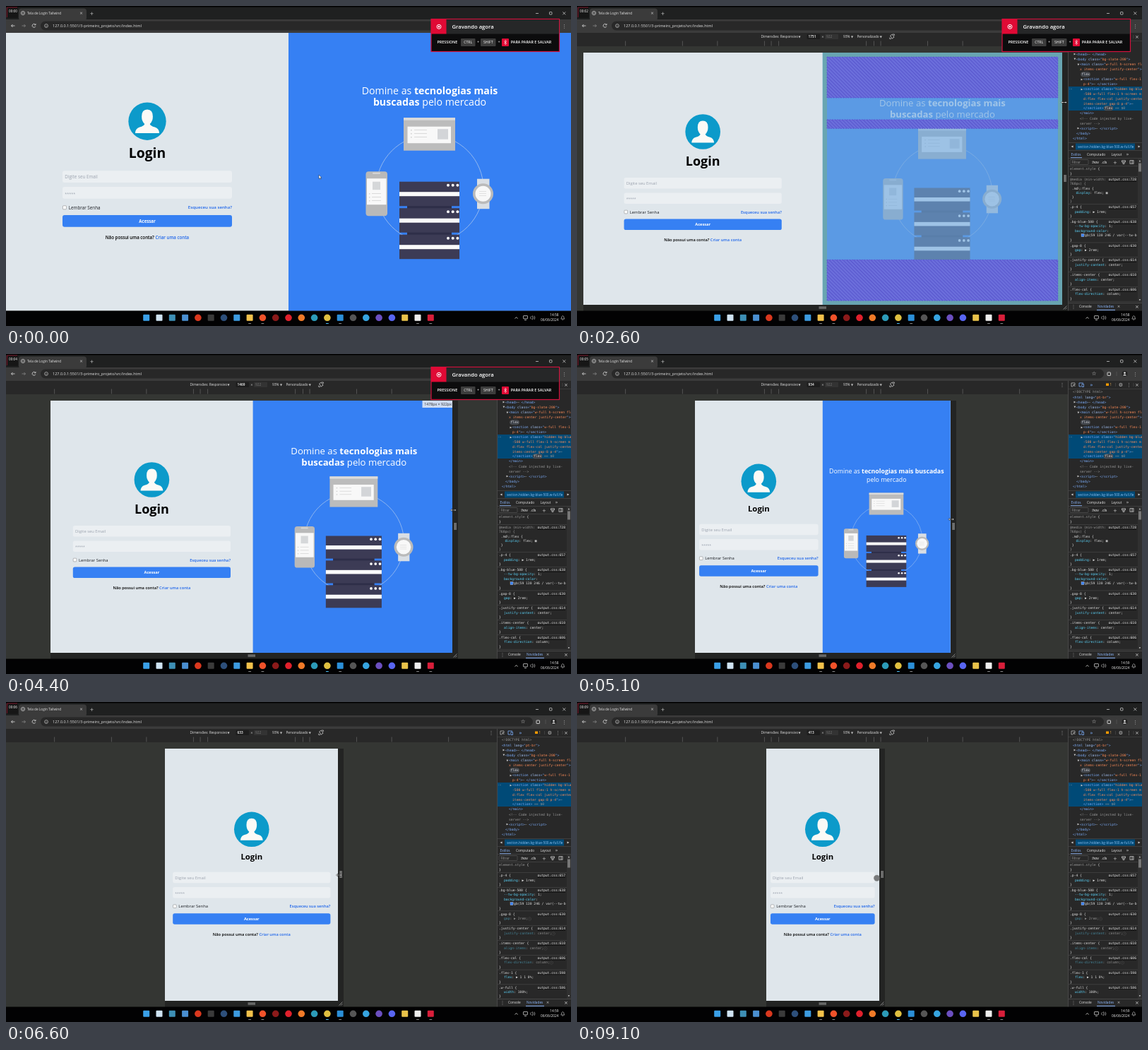
Animation of 800x453 px, one loop 9300 ms. Source, as an HTML page:

```html
<!DOCTYPE html>
<html lang="pt-br">
<head>
<meta charset="utf-8">
<style>
html, body { margin: 0; width: 100%; height: 100%; overflow: hidden; background: #000; }
svg { display: block; width: 100vw; height: 100vh; }
text { white-space: pre; font-family: "Open Sans", "Noto Sans", sans-serif; }
.m { font-family: "DejaVu Sans Mono", "Liberation Mono", monospace; }
.i { font-family: "DejaVu Sans", sans-serif; }
</style>
</head>
<body>
<svg id="stage" viewBox="0 0 800 453" preserveAspectRatio="none"></svg>
<script>
const stage = document.getElementById('stage');
const LOOP = 9300, FULL = 1 / 2.4, ZOOM = 0.3875, MID = 347.8;
const BLUE = '#3680f3', SLATE = '#dfe6eb', LINK = '#1f66ea';

// --- drawing helpers (text y is the middle of the line) ---
const esc = s => s.replace(/&/g, '&amp;').replace(/</g, '&lt;');
const rect = (x, y, w, h, fill, rx = 0, more = '') =>
  `<rect x="${x}" y="${y}" width="${w}" height="${h}" fill="${fill}" rx="${rx}" ${more}/>`;
const circle = (x, y, r, fill, more = '') => `<circle cx="${x}" cy="${y}" r="${r}" fill="${fill}" ${more}/>`;
const path = (d, stroke, w = 1, fill = 'none') => `<path d="${d}" stroke="${stroke}" stroke-width="${w}" fill="${fill}"/>`;
const text = (x, y, size, s, fill = '#e3e3e3', more = '') =>
  `<text x="${x}" y="${y + size * 0.36}" font-size="${size}" fill="${fill}" ${more}>${esc(s)}</text>`;
const icon = (x, y, size, s, fill = '#c7c7c7') => text(x, y, size, s, fill, 'class="i" text-anchor="middle"');
const group = (transform, body) => `<g transform="${transform}">${body}</g>`;
const MIDDLE = 'text-anchor="middle" ', END = 'text-anchor="end" ', BOLD = 'font-weight="700"', SEMI = 'font-weight="600"';

// "^x" inside a string switches to colour x
const INK = { t: '#7cacf8', n: '#a8c7fa', v: '#fe8d59', g: '#9a9a9a', w: '#e3e3e3', c: '#5cd5fb' };
const mono = (x, y, s, more = '') => `<text class="m" x="${x}" y="${y + 1.6}" font-size="4.7" ${more}>` +
  s.split('^').slice(1).map(p => `<tspan fill="${INK[p[0]]}">${esc(p.slice(1))}</tspan>`).join('') + '</text>';

function track(keys, t) {
  const i = keys.findIndex(k => k[0] > t);
  if (i < 0) return keys[keys.length - 1].slice(1);
  if (i === 0) return keys[0].slice(1);
  const a = keys[i - 1], b = keys[i], f = (t - a[0]) / (b[0] - a[0]);
  return a.slice(1).map((v, j) => v + (b[j + 1] - v) * f);
}

// --- motion ---
const widthKeys = [[2800, 1751], [3600, 1619], [4400, 1469], [5000, 934], [5200, 934], [6000, 745],
  [6500, 633], [6700, 633], [7800, 425], [8100, 416], [8400, 416], [8700, 413]];
const pointerKeys = [[0, 443, 239], [500, 462, 197], [1000, 462, 197], [1200, 484, 247], [1500, 497, 374],
  [1900, 497, 374], [2300, 745, 130], [2600, 689.5, 136.5]];
const gripKeys = [[2600, 136.5], [4400, 221], [5100, 234], [6600, 245], [8400, 249]];

// --- web page, in CSS pixels ---
function avatar() {
  return circle(0, 0, 64, '#0c9aca') +
    path('M-41 40 Q-40 24 -26 20 Q-11 16 -9 9 Q-19 0 -19 -16 Q-19 -40 0 -40 Q19 -40 19 -16 Q19 0 9 9 Q11 16 26 20 Q40 24 41 40 Z', 'none', 0, '#fbfaf6');
}

function form(cx, cy, room, small) {
  const w = Math.min(576, room), l = -w / 2, d = small ? -12 : 0;
  const box = (y, fill) => rect(l, y + d, w, 40, fill, 7);
  return group(`translate(${cx} ${cy - 172 - d / 2})`, avatar() +
    text(0, small ? 99 : 107, small ? 29.3 : 46.5, 'Login', '#000', MIDDLE + BOLD) +
    box(168, '#ebeff2') + text(l + 8, 188 + d, 15.1, 'Digite seu Email', '#9ca3af') +
    box(223, '#ebeff2') + text(l + 8, 246 + d, 13, '*****', '#9ca3af') +
    rect(l + 1, 287 + d, 12, 12, '#fff', 2, 'stroke="#767676" stroke-width="1.2"') +
    text(l + 21, 293 + d, 15.1, 'Lembrar Senha', '#1c1f24') +
    text(-l, 293 + d, 14.7, 'Esqueceu sua senha?', LINK, END + SEMI) +
    box(319, BLUE) + text(0, 339 + d, 14.6, 'Acessar', '#fff', MIDDLE + BOLD) +
    `<text x="0" y="${401 + d}" font-size="14.8" ${MIDDLE + SEMI}>Não possui uma conta? <tspan fill="${LINK}">Criar uma conta</tspan></text>`);
}

function devices() {
  let s = circle(600, 258.5, 76, 'none', 'stroke="#a9c6ee" stroke-width=".8"');
  // monitor
  s += rect(563, 158, 73, 46.5, '#bcbcbc') + rect(563, 158, 73, 3.5, '#dcdcdc') + rect(568.5, 170.5, 61.5, 23.5, '#f8f8f8') +
    rect(611, 174, 15, 14.5, '#d3d5d8');
  for (const y of [175, 180, 185]) s += rect(573, y, 1.6, 1.2, '#c8c8c8') + rect(578, y, 18, 0.8, '#d4d4d4');
  // phone
  s += rect(509.5, 234, 30.5, 63, '#b9b9b9', 4) + rect(511, 244, 27.5, 37, '#f8f8f8') + rect(519, 248.5, 11, 11.5, '#d5d7d9') +
    rect(519, 235.5, 11, 2, '#d8d8d8', 1);
  for (const y of [265, 270, 275]) s += rect(514, y, 1.5, 1.2, '#ccc') + rect(518, y, 13, 0.8, '#d4d4d4');
  // watch
  s += rect(667, 244.5, 17.5, 42.5, '#d9dee4') + circle(675.5, 265.5, 14.5, '#bababa') + circle(675.5, 265.5, 11, '#f8f8f8');
  for (const y of [262, 265, 268]) s += rect(670, y, 10, 0.7, '#d8d8d8');
  // servers
  s += rect(568, 282, 63, 44, '#2e2e48');
  for (const y of [248.5, 286, 323.5]) {
    s += rect(557, y, 85, 34.5, '#3c3b55') + rect(557, y + 14.5, 85, 6, '#fafafa');
    for (const x of [626, 632.7, 639.4]) s += circle(x, y + 5, 2, '#fafafa');
  }
  return s;
}

function hero(cx, cy, room, small) {
  const lh = small ? 32 : 40, size = small ? 22.7 : 34, scale = Math.min(1, room / 607);
  const top = cy - (lh * 2 + 32 + 480 * scale) / 2;
  const long = small && room >= 420;
  const line = (n, html) => `<text x="${cx}" y="${top + lh * (n + 0.5) + size * 0.35}" font-size="${size}" fill="#fff" ${MIDDLE}>${html}</text>`;
  const b = s => `<tspan font-weight="700">${s}</tspan>`;
  return line(0, 'Domine as ' + b('tecnologias mais' + (long ? ' buscadas' : ''))) +
    line(1, (long ? '' : b('buscadas') + ' ') + 'pelo mercado') +
    group(`translate(${cx} ${top + lh * 2 + 32}) scale(${scale * 2.4}) translate(-600 -158)`, devices());
}

function inspected(W, H) {
  const x = W / 2, w = W / 2, l = x + 16, iw = w - 32, cy = H / 2;
  const gap = (a, b) => rect(l, a, iw, b - a, '#6b6edb') + rect(l, a, iw, b - a, 'url(#hatch)', 0, 'stroke="#5a4fd0" stroke-width="2" stroke-dasharray="5 4"');
  return `<path d="M${x} 0h${w}v${H}h${-w}zM${l} 16v${H - 32}h${iw}v${32 - H}z" fill="#93c47d" fill-opacity=".55"/>` +
    rect(l, 16, iw, H - 32, '#6fa8dc', 0, 'fill-opacity=".66"') +
    gap(16, cy - 296) + gap(cy - 216, cy - 184) + gap(cy + 296, H - 16);
}

function page(W, H) {
  const wide = W >= 768, small = W < 1024, half = W / 2;
  return rect(0, 0, W, H, SLATE) + form(wide ? half / 2 : half, H / 2, (wide ? half : W) - 32, small) +
    (wide ? rect(half, 0, half, H, BLUE) + hero(half * 1.5, H / 2, half - 32, small) : '');
}

// --- browser window ---
function chrome() {
  return rect(0, 0, 800, 1.5, '#000') + rect(0, 1.5, 800, 18.5, '#1f2020') + rect(18, 3.5, 96, 17, '#3b3b3b', 4) + rect(0, 19, 800, 19, '#3b3b3b') +
    rect(49, 21.5, 697, 13, '#282828', 6.5) +
    circle(24, 10, 2.7, 'none', 'stroke="#bbb" stroke-width=".8"') + path('M21.5 10h5M24 7.5v5', '#bbb', 0.5) +
    text(30, 10, 4.75, 'Tela de Login Tailwind') + icon(106.5, 10, 6, '×') + icon(121.5, 10, 7, '+') +
    path('M750 10.5h4M788.3 8.3l4 4m0-4l-4 4', '#ddd', 0.7) + rect(769.5, 8.5, 3.5, 3.5, 'none', 0.6, 'stroke="#ddd" stroke-width=".7"') +
    path('M12.5 28h-5m2-2l-2 2 2 2', '#ddd', 0.8) + path('M22.5 28h5m-2-2l2 2-2 2', '#888', 0.8) +
    path('M41.4 26.3a2.4 2.4 0 1 0 .4 2.4M42 25v1.8h-1.8', '#ddd', 0.8) +
    circle(57, 28, 2.4, 'none', 'stroke="#ccc" stroke-width=".7"') + path('M57 27.5v2', '#ccc', 0.6) +
    text(66, 28, 5.5, '127.0.0.1:5501/3-primeiro_projeto/src/index.html') +
    icon(732, 27.7, 7.5, '☆', '#f0f0f0') + rect(751, 26, 4.5, 4.5, 'none', 0.6, 'stroke="#ddd" stroke-width=".9"') +
    path('M764 25v6', '#666', 0.5) + circle(775.5, 28, 4, '#242424') + circle(775.5, 26.8, 1.3, '#eee') +
    path('M773 30.6q2.5-3.6 5 0z', 'none', 0, '#eee') + icon(790.5, 28, 7, '⋮');
}

const apps = [['s', '#3aa0e8'], ['s', '#cfe3f2'], ['s', '#3d8fb5'], ['s', '#4a8fd0'], ['c', '#d9381e'], ['s', '#3a3a3a'],
  ['c', '#2d4f7a'], ['s', '#3c9be0'], ['s', '#f2c14b'], ['c', '#f0522a'], ['c', '#8b1a1a'], ['c', '#e0202c'], ['c', '#f07a28'],
  ['c', '#2c9bb8'], ['c', '#e0c040'], ['s', '#2b8fd8'], ['c', '#555'], ['c', '#36a4e0'], ['c', '#6b4fc0'], ['c', '#5865f2'],
  ['s', '#e8c24a'], ['s', '#eee'], ['s', '#d81e3a']];

function taskbar(t) {
  let s = rect(0, 431.5, 800, 21.5, '#020203');
  apps.forEach(([kind, c], i) => {
    const x = 198.7 + 18.3 * i;
    s += kind === 'c' ? circle(x, 441.3, 4.8, c) : rect(x - 4.5, 436.8, 9, 9, c, 1);
    if ([8, 9, 14, 15, 21, 22].includes(i)) s += rect(x - 2, 449, 4, 1, i === 14 ? '#4cc2ff' : '#888', 0.5);
  });
  return s + path('M720.5 442.5l2-2 2 2', '#ddd', 0.8) + rect(732.5, 438.5, 6, 4.2, 'none', 0.5, 'stroke="#ddd" stroke-width=".7"') +
    path('M734 444.5h3', '#ddd', 0.7) + path('M742.5 440h1.3l1.7-1.5v5.6l-1.7-1.5h-1.3z', '#ddd', 0.4) + path('M746.7 439.5q1.5 1.8 0 3.6M748 438.6q2.2 2.7 0 5.4', '#ddd', 0.5) +
    text(782.5, 437.7, 4.8, t < 5100 ? '14:58' : '14:59', '#eee', END) + text(782.5, 444.7, 4.8, '06/06/2024', '#eee', END) +
    path('M785.8 443h5l-.8-1.5v-1.5q-1.7-3-3.4 0v1.5zM787.5 444.2h1.6', '#ddd', 0.6);
}

// [y, label, shortcut, dim]
const menuRows = [[206.5, 'Voltar', 'Alt+Seta para a esquerda'], [218, 'Avançar', 'Alt+Seta para a direita', 1],
  [230, 'Recarregar', 'Ctrl+R'], [248.3, 'Salvar como...', 'Ctrl+S'], [260, 'Imprimir...', 'Ctrl+P'], [271.7, 'Transmitir...'],
  [283.4, 'Pesquisar imagens com Zumbra'], [302, 'Enviar para seus dispositivos'], [314, 'Criar QR code para esta página'],
  [333.5, 'Traduzir para o português'], [345, 'Abrir no modo de leitura'], [364, 'Exibir código fonte da página', 'Ctrl+U'], [375.7, 'Inspecionar']];

function menu(y) {
  let s = rect(462, 197, 162, 187.5, '#1f1f1f', 4, 'stroke="#111" stroke-width=".6"');
  for (const line of [239, 293, 324, 354.5]) s += rect(462.5, line, 161, 0.6, '#454545');
  for (const [cy, label, keys, dim] of menuRows) {
    const c = dim ? '#777' : '#e6e6e6';
    if (Math.abs(y - cy) < 5.9) s += rect(462.5, cy - 5.9, 161, 11.8, '#3d3d3d');
    s += text(483.5, cy, 4.75, label, c);
    if (keys) s += text(615, cy, 4.75, keys, c, END);
  }
  s += rect(541.5, 342, 14.5, 6, '#1668a8', 1) + text(548.7, 345, 3.9, 'NOVO', '#cfe8ff', MIDDLE + BOLD);
  s += rect(472, 300, 5, 3.5, 'none', 0.4, 'stroke="#ccc" stroke-width=".6"') + path('M471 304.5h3.5', '#ccc', 0.7);
  for (const dx of [0, 3.6]) for (const dy of [0, 3.6]) s += rect(472 + dx, 311.3 + dy, 2, 2, 'none', 0, 'stroke="#ccc" stroke-width=".7"');
  return s;
}

function notice() {
  const key = (x, w, label) => rect(x, 46, w, 11, '#3d3d3d', 1) + text(x + w / 2, 51.5, 5.2, label, '#fff', MIDDLE);
  return rect(602, 18.5, 181.5, 46, '#0c0c0d', 0, 'stroke="#d3123d" stroke-width="1.2"') + rect(623, 19.2, 160, 20.3, '#262728') +
    rect(602, 18.5, 21.5, 21, '#e00a35') + circle(613, 29.3, 3, 'none', 'stroke="#fff" stroke-width="1"') + circle(613, 29.3, 1.3, '#fff') +
    text(631.5, 29.5, 7.7, 'Gravando agora', '#fff', SEMI) + text(610.5, 51.5, 5.4, 'PRESSIONE', '#fff', SEMI) +
    key(644, 20.5, 'CTRL') + text(668.5, 51.5, 5.5, '+', '#fff', MIDDLE) + key(672, 21.5, 'SHIFT') + text(698, 51.5, 5.5, '+', '#fff', MIDDLE) +
    rect(702, 46, 10, 11, '#e00a35', 1) + path('M705.3 49.5l3.4 3.6-1.7 1.6v-6.4l1.7 1.6-3.4 3.6', '#fff', 0.6) +
    text(714.8, 51.5, 5.4, 'PARA PARAR E SALVAR', '#fff', SEMI);
}

function timer(t) {
  const sec = t < 9000 ? Math.min(8, Math.floor((t + 100) / 1000)) : 9;
  return rect(1, 1.5, 16, 15.5, '#161616', 1) + path('M1.5 16V2H16', '#a3122f', 0.7) + text(10, 7, 4.7, '00:0' + sec, '#fff', MIDDLE);
}

// --- developer tools ---
// [x, y, marked text, arrow]
const tree = [[702, 53.5, '^g<!DOCTYPE html>'], [702, 61, '^t<html ^nlang^t="^vpt-br^t">'], [707, 68, '^t<head>^g⋯ ^t</head>', '▶'],
  [707, 75, '^t<body ^nclass^t="^vbg-slate-200^t">', '▼'], [712, 82.5, '^t<main ^nclass^t="^vw-full h-screen fle', '▼'],
  [712, 89.5, '^vx items-center justify-center^t">'], [717, 103.5, '^t<section ^nclass^t="^vw-full flex-1', '▶'],
  [717, 110.5, '^vp-4^t">^g⋯ ^t</section>'], [717, 117.5, '^t<section ^nclass^t="^vhidden bg-blue', '▶'],
  [717, 124.5, '^v-500 w-full flex-1 h-screen m'], [717, 131, '^vd:flex flex-col justify-center'], [717, 138, '^vitems-center gap-8 p-4^t">^g⋯'],
  [717, 144.7, '^t</section>'], [712, 151.5, '^t</main>'], [712, 159, '^g<!-- Code injected by live-'], [712, 166, '^gserver -->'],
  [712, 173, '^t<script>^g⋯ ^t<\/script>', '▶'], [707, 180.5, '^t</body>'], [702, 187.5, '^t</html>']];

// [selector, source line, declarations, needs flex]
const rules = [['.p-4', 657, ['^cpadding^w: ▶ 1rem;']],
  ['.bg-blue-500', 638, ['^c--tw-bg-opacity^w: 1;', '^cbackground-color^w:', '^w    rgb(59 130 246 / var(--tw-b']],
  ['.gap-8', 630, ['^cgap^w: ▶ 2rem;'], 1], ['.justify-center', 614, ['^cjustify-content^w: center;'], 1],
  ['.items-center', 610, ['^calign-items^w: center;'], 1], ['.flex-col', 606, ['^cflex-direction^w: column;'], 1],
  ['.flex-1', 598, ['^cflex^w: ▶ 1 1 0%;']], ['.w-full', 586, ['^cwidth^w: 100%;']]];

function styles(wide) {
  let y = 245.5, s = '';
  const link = n => mono(792, y, '^woutput.css:' + n, END + 'text-decoration="underline"');
  const rule = () => rect(696, y - 4.3, 98, 0.5, '#505050');
  if (wide) {
    s += rule() + link(728) + ['^g@media (min-width:', '^g768px) {', '^w .md\\:flex {', '^c   display^w: flex; ▦', '^w }', '^g}']
      .map((l, i) => mono(698, y + i * 6.2, l)).join('');
    y = 284.6;
  }
  for (const [sel, n, lines, flex] of rules) {
    if (y > 424) break;
    s += rule() + link(n) + mono(698, y, `^w${sel} {`);
    for (const l of lines) {
      y += 6.4;
      const off = flex && !wide;
      s += mono(705, y, off ? l + '^gⓘ' : l, off ? 'opacity=".55"' : '');
      if (l.includes('rgb(')) s += rect(714, y - 2, 4, 4, '#3b82f6', 0, 'stroke="#ccc" stroke-width=".4"');
    }
    s += mono(698, y += 6.4, '^w}');
    y += 8;
  }
  return `<g clip-path="url(#pane)">${s}</g>`;
}

function devtools(wide) {
  const pill = (x, y) => rect(x, y - 3, 13, 6, '#3a3f47', 3, 'stroke="#777" stroke-width=".4"') + mono(x + 1, y, '^wflex');
  let s = rect(695, 38, 105, 394, '#282828') + rect(695, 38, 0.7, 394, '#555') + rect(695, 49, 105, 0.5, '#4a4a4a');
  s += path('M700 41h5v2M700 41v5h2M703 43.5l2.5 2.5m-2.5 0v-2.5h2.5', '#c7c7c7', 0.7) +
    path('M711 46v-5h6M711 46h3M715 42.5h2.5v4h-2.5z', '#7cacf8', 0.8) + icon(728.5, 43, 7, '»', '#7cacf8') +
    rect(749, 41.5, 4, 3.5, '#f29900') + text(754.5, 43.5, 4.5, '1', '#f5b95c') + path('M762.5 41v5M788 41v5', '#555', 0.5) +
    icon(770, 43.3, 7, '⚙') + icon(781.5, 43.3, 7, '⋮') + icon(793, 43.3, 7, '×');
  s += rect(696, 114, 104, 34, '#004a77') + text(697, 117, 4.5, '⋯', '#ccc', 'class="i"');
  for (const [x, y, line, arrow] of tree) s += mono(x, y, line) + (arrow ? icon(x - 2.2, y, 3.6, arrow) : '');
  s += pill(713.5, 96.7) + (wide ? pill(746, 144.7) + mono(762, 144.7, '^g== $0') : mono(748, 144.7, '^g== $0'));
  // breadcrumb, tabs and filter
  s += rect(696, 193.5, 104, 0.5, '#555') + rect(706, 194.5, 84, 9, '#004a77') +
    text(709, 199, 4.7, 'section.hidden.bg-blue-500.w-full.fle', '#8fc3f5') + icon(701, 199, 4, '◀') + icon(796, 199, 4, '▶') +
    rect(696, 204.5, 104, 0.5, '#555') + text(699.5, 210, 4.75, 'Estilos', '#8ab4f8') + rect(699, 214.3, 16, 1, '#8ab4f8') +
    text(722, 210, 4.75, 'Computado') + text(756.5, 210, 4.75, 'Layout') + icon(779.5, 210, 6.5, '»') + rect(696, 215.5, 104, 0.5, '#555') +
    rect(698, 217.5, 26, 7, '#282828', 1, 'stroke="#666" stroke-width=".5"') + text(700.5, 221, 4.5, 'Filtrar', '#999') +
    text(729, 221, 4.75, ':hov', '#ddd', SEMI) + text(743, 221, 4.75, '.cls', '#ddd', SEMI) + icon(762, 221, 7, '+') +
    path('M771.5 218.8h5v2h-5zM773 221v2.5h2V221', '#ccc', 0.8) + rect(783, 218.7, 5, 4.5, 'none', 0, 'stroke="#ccc" stroke-width=".8"') + path('M786 219v4', '#ccc', 0.8) +
    rect(696, 226, 98, 0.5, '#555') + mono(698, 230.5, '^gelement.style ^w{') + mono(698, 237, '^w}') + styles(wide) +
    rect(794, 216, 6, 204, '#303030') + rect(795, 222.5, 4, 12, '#777') + icon(797, 219, 3, '▲') + icon(797, 416, 3, '▼');
  // drawer
  return s + rect(696, 420, 104, 12, '#282828') + rect(696, 420, 104, 0.6, '#5a5a5a') + icon(703, 425.5, 6.5, '⋮') + text(711, 425.5, 4.75, 'Console') +
    text(737, 425.5, 4.75, 'Novidades', '#8ab4f8') + rect(736, 429.8, 26, 1, '#8ab4f8') + icon(767, 425.5, 5.5, '×') + icon(793, 425.5, 7, '×');
}

function deviceView(w, laid, t) {
  const half = w * ZOOM / 2, l = Math.round(MID - half), r = Math.round(MID + half), pw = r - l, ph = 357;
  let s = rect(0, 38, 695, 394, '#343633') + rect(0, 38, 695, 19, '#282828');
  // ticks at the preset screen widths
  for (const preset of [320, 375, 425, 768, 1024, 1440]) for (const sign of [-1, 1])
    s += rect(MID - 0.5 + sign * preset * ZOOM / 2, 49.5, 0.8, 7, '#5e5e5e');
  s += text(260.5, 43.3, 4.75, 'Dimensões: Responsivo') + icon(315, 43.3, 4, '▼') +
    rect(325.5, 39.7, 18.5, 7.2, '#1d1d1d', 1) + text(327.5, 43.3, 4.75, String(Math.round(w)), '#fff', SEMI) + icon(347.8, 43.3, 4.5, '×') +
    rect(351, 39.7, 19, 7.2, '#333', 1) + text(353, 43.3, 4.75, '922', '#777') +
    text(377, 43.3, 4.75, '93%') + icon(389.5, 43.3, 4, '▼') + text(396.5, 43.3, 4.75, 'Personalizado') + icon(430.3, 43.3, 4, '▼') +
    path('M443.5 42l3-2 2.5 4.2-3 2zM442.8 44.5v2h2M449.3 42v-2h-2', '#ccc', 0.8) + icon(687, 43.3, 7, '⋮');
  s += rect(l, 66, pw + 8, 366, '#232423');
  for (const d of [-1.3, 0.6]) s += rect(r + 4 + d, 239, 0.9, 10, '#bbb') + rect(342.5, 427 + d, 10.5, 0.8, '#bbb');
  s += path(`M${r + 1.5} 429.5l5-5m-2.5 5l2.5-2.5`, '#aaa', 0.7);
  s += `<clipPath id="view">${rect(l, 66, pw, ph, '#000')}</clipPath><g clip-path="url(#view)">` + rect(l, 66, pw, ph, SLATE) +
    group(`translate(${MID - half} 66) scale(${ZOOM})`, page(laid, 922) + (t >= 2200 && t < 2800 ? inspected(laid, 922) : ''));
  if (t >= 2900 && t < 4700) s += rect(r - 42.5, 66, 43, 10, '#dfe6f2', 0, 'fill-opacity=".9"') +
    text(r - 1, 71, 5.3, Math.round(laid) + 'px × 922px', '#333', END);
  return s + '</g>';
}

function pointer(t, right) {
  if (t >= 8600) return circle(424.5, 249.3, 4.2, '#555', 'fill-opacity=".75" stroke="#888" stroke-width=".4"');
  if (t >= 2500) {
    const x = t <= 2600 ? 689.5 : right + 1, [y] = track(gripKeys, t);
    return group(`translate(${x} ${y})`, path('M-4 0l2-1.8v1.3h4v-1.3l2 1.8-2 1.8v-1.3h-4v1.3z', '#000', 0.5, '#fff'));
  }
  const [x, y] = track(pointerKeys, t);
  return group(`translate(${x} ${y})`, path('M0 0v5.6l1.3-1.2.9 2 .9-.4-.9-2h1.7z', '#000', 0.4, '#fff'));
}

const defs = '<defs><pattern id="hatch" width="9" height="9" patternUnits="userSpaceOnUse" patternTransform="rotate(-45)">' +
  '<rect width="2.5" height="9" fill="#5755cc"/></pattern>' + `<clipPath id="pane">${rect(696, 227, 98, 193, '#000')}</clipPath></defs>`;

function scene(t) {
  const [w] = track(widthKeys, t), [laid] = track(widthKeys, t - 50);
  const open = t >= 1900;
  return defs + chrome() +
    (open ? deviceView(w, laid, t) + devtools(laid >= 768) : group(`translate(0 38) scale(${FULL})`, page(1920, 945))) +
    taskbar(t) + (t >= 1000 && t < 1600 ? menu(track(pointerKeys, t)[1]) : '') +
    (t < 4900 ? notice() : '') + timer(t) + pointer(t, MID + w * ZOOM / 2);
}

let shown = -1;
function tick() {
  const t = Math.floor(performance.now() % LOOP / 100) * 100;
  if (t !== shown) stage.innerHTML = scene(shown = t);
  requestAnimationFrame(tick);
}
tick();
</script>
</body>
</html>
```
